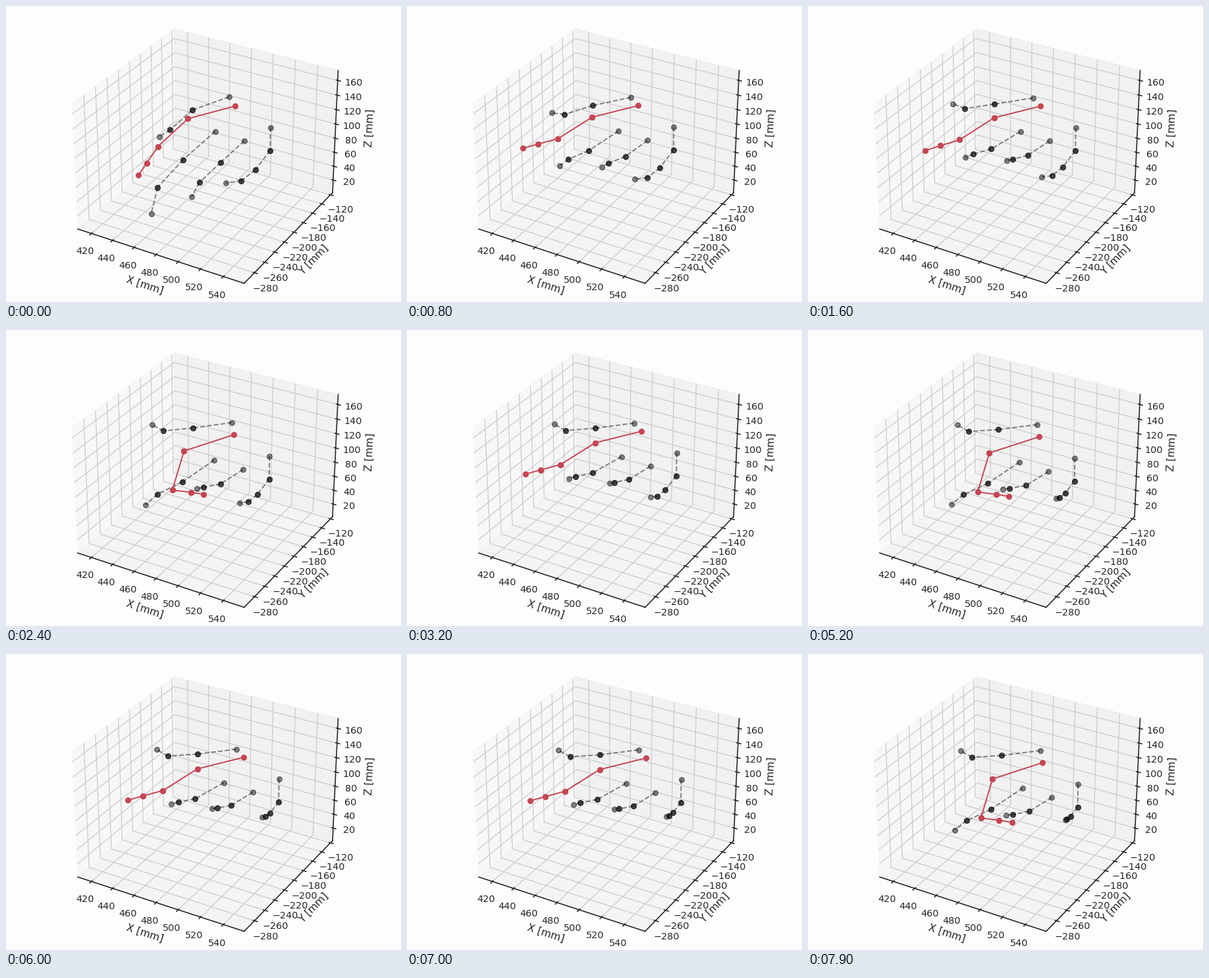
A matplotlib script that plays this animation: 600 px wide and 450 px high, repeating every 8000 ms.

```python
import numpy as np
import matplotlib.pyplot as plt
from matplotlib.animation import FuncAnimation

W, H, DPI = 600, 450, 93.75
FRAMES, STEP = 80, 100
INK, GRID, RED, PAPER = "0.15", "0.8", "#c54653", "#fefdfe"

PERIOD, TAP, HOLD, MOVE = 2.75, 1.57, 0.88, 0.45   # seconds
MID = 4.5              # time at which the slow drift is zero
DRIFT = 1.8 + 1.1j     # px per second
SWAY = -8 + 6j         # shift of the knuckles while tapping
SETTLE = 0.8           # time constant of the opening stretch

plt.rcParams.update({
    "font.family": "DejaVu Sans",
    "text.color": INK, "axes.labelcolor": INK, "axes.edgecolor": INK,
    "xtick.color": INK, "ytick.color": INK, "grid.color": GRID,
    "axes.linewidth": 1.25, "grid.linewidth": 1,
    "xtick.major.width": 1.25, "ytick.major.width": 1.25,
    "axes.labelsize": 12, "xtick.labelsize": 11, "ytick.labelsize": 11,
    "lines.linewidth": 1.5, "lines.markersize": 6,
})


def ease(u):
    u = np.clip(u, 0, 1)
    return u * u * (3 - 2 * u)


def press(t):
    """0 with the index finger raised, 1 with it curled down."""
    c = (t - TAP) % PERIOD
    return ease(c / MOVE) - ease((c - HOLD) / MOVE)


class Finger:
    """Chain of bones; each bone is scaled and turned by exp(complex)."""

    def __init__(self, joints, tap=0, start=0, trend=0, sway=SWAY, **style):
        x, y = joints[::2], joints[1::2]
        points = np.array(x) + 1j * np.array(y)
        self.knuckle, self.bones = points[0], np.diff(points)
        n = np.arange(len(self.bones))
        # A single rate grows towards the fingertip.
        self.tap = tap * (n + 0.5) if np.isscalar(tap) else np.array(tap)
        self.start, self.trend = start * (n + 0.5), trend * n
        self.sway, self.style = sway, style

    def add_to(self, ax):
        # One line per bone, so translucent inner joints are drawn twice.
        self.lines = [ax.plot([], [], marker="o", **self.style)[0]
                      for _ in self.bones]

    def pose(self, t):
        p = press(t)
        bones = self.bones * np.exp(self.tap * p
                                    + self.start * np.exp(-t / SETTLE)
                                    + self.trend * (t - MID))
        knuckle = self.knuckle + DRIFT * (t - MID) + self.sway * p
        joints = knuckle + np.concatenate([[0], np.cumsum(bones)])
        for line, a, b in zip(self.lines, joints, joints[1:]):
            line.set_data([a.real, b.real], [a.imag, b.imag])


GREY = dict(color="0.06", alpha=0.5, linestyle="--")
REACH = 0.45 - 0.38j

# Joints of the raised hand from knuckle to tip, in pixels.
hand = [
    Finger((347, 143, 288, 150.5, 243, 153.5, 226, 143.5),
           start=-0.44j, sway=0, **GREY),
    Finger((328, 194, 284.5, 218.5, 259, 223.5, 248.5, 226.5),
           tap=0.3 - 0.16j, start=REACH, **GREY),
    Finger((372, 208.5, 339.5, 228.5, 318, 232.5, 310.5, 233.5),
           tap=0.1, start=REACH, **GREY),
    Finger((412, 188, 411.5, 223, 396.5, 242.5, 387, 250, 380, 251),
           trend=-0.09, **GREY),
    Finger((358, 155.5, 288, 173, 235.5, 206, 205.5, 214, 182.5, 220.5),
           tap=(0.1 - 0.07j, -0.72j, -0.1 - 2.76j, -0.2 - 2.7j),
           color=RED, linestyle="-"),
]

fig = plt.figure(figsize=(W / DPI, H / DPI), dpi=DPI, facecolor=PAPER)

box = fig.add_axes([0, 0, 1, 1], projection="3d")
box.patch.set_visible(False)
box.set(xlim=(406.98, 558.02), ylim=(-300, -115.2), zlim=(1.56, 173.44),
        xticks=range(420, 541, 20), yticks=range(-280, -119, 20),
        zticks=range(20, 161, 20),
        xlabel="X [mm]", ylabel="Y [mm]", zlabel="Z [mm]")

stage = fig.add_axes([0, 0, 1, 1])
stage.set(xlim=(0, W), ylim=(H, 0))
stage.axis("off")
for finger in hand:
    finger.add_to(stage)


def draw(k):
    for finger in hand:
        finger.pose(k * STEP / 1000)
    return [line for finger in hand for line in finger.lines]


anim = FuncAnimation(fig, draw, frames=FRAMES, interval=STEP,
                     repeat=True, repeat_delay=0)
plt.show()
```
